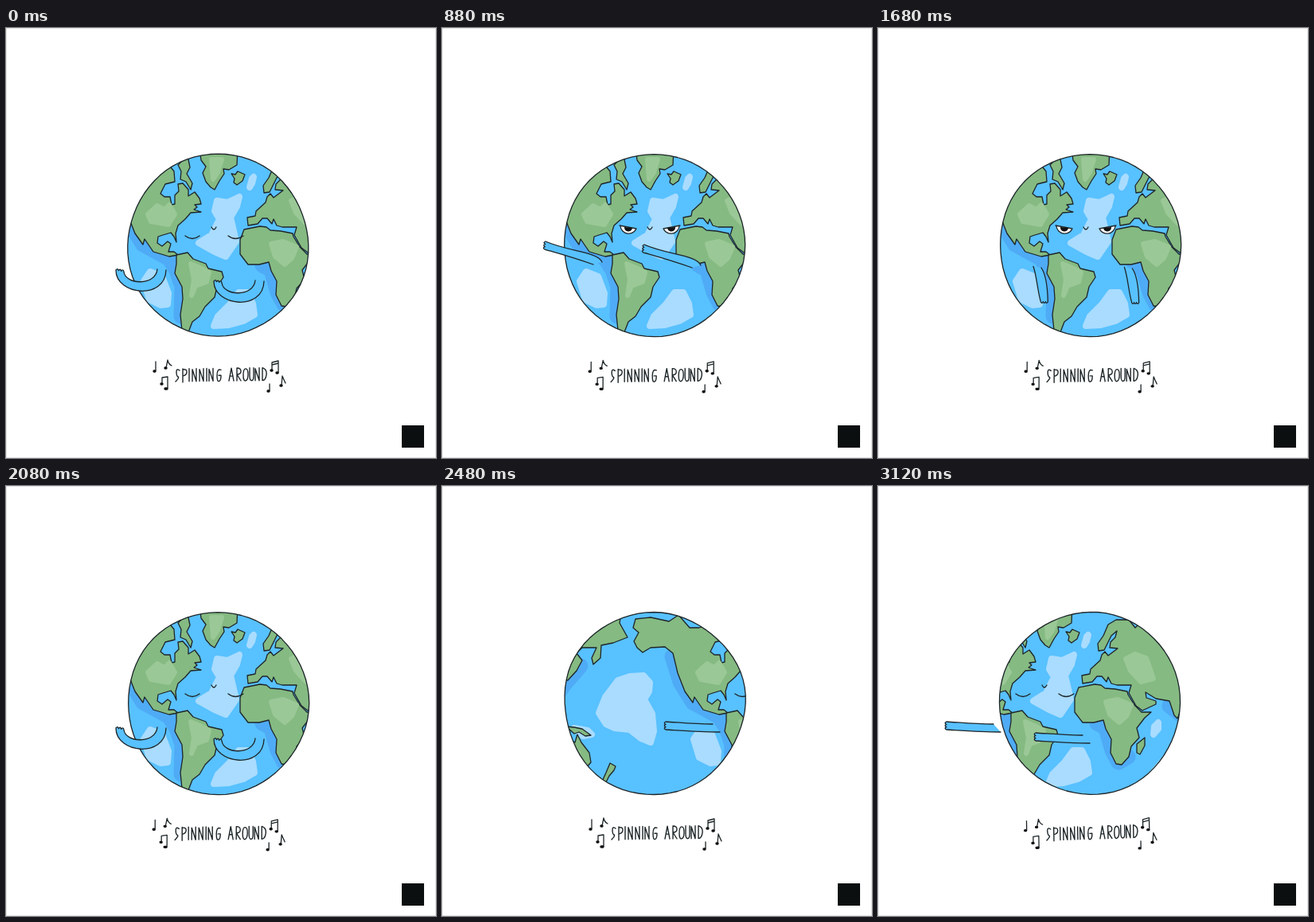
Write an HTML page that moves like this. It is 540 by 540 pixels and loops after 3.2 s.

```html
<!DOCTYPE html>
<html lang="en">
<head>
<meta charset="utf-8">
<title>Spinning around</title>
<style>
html, body { margin: 0; width: 100%; height: 100%; overflow: hidden; background: #fff; }
svg { display: block; width: 100vw; height: 100vh; }
path { stroke-linejoin: round; stroke-linecap: round; }
.ink { fill: none; stroke: #1d2528; stroke-width: 1.3; }
.land { fill: #85ba82; stroke: #1d2528; stroke-width: 1.3; }
.glow { fill: #a9dcff; stroke: #a9dcff; stroke-width: 8; }
.grass { fill: #9ac896; stroke: #9ac896; stroke-width: 6; }
.deep { fill: none; stroke: #4fabf6; stroke-width: 19; }
.arm { fill: #58c1ff; }
.dot { fill: #111; }
</style>
</head>
<body>
<svg viewBox="0 0 540 540">
  <defs>
    <clipPath id="disc"><path class="rim"/></clipPath>
    <clipPath id="reach"><path class="rim"/><rect width="266" height="540"/></clipPath>
    <g id="map">
      <path class="deep" d="M146 214L156 246L172 272L205 290L214 304L221 325L220 362M322 298L333 304L341 332L349 347L361 340M507 226L486 250L474 268L461 284L446 288L427 287L413 276"/>
      <path class="glow" d="M265 217L278 219L293 212L290 224L282 238L286 255L289 268L276 287L262 281L242 270L258 260L268 240L262 230Z
        M306 200L309 189L311 187L309 195Z
        M261 374L266 362L281 347L292 332L303 332L310 346L312 360L298 368L280 373Z
        M173 318L181 306L196 312L204 333L203 347L194 348L180 341Z
        M54 285L62 265L78 244L93 239L110 238L118 247L117 258L111 268L121 286L123 308L119 322L107 317L93 306L74 304L63 299Z
        M387 366L404 346L423 326L436 324L447 332L450 361L423 366Z
        M393 312L394 302L399 297L399 305Z
        M499 304L516 307L521 312L510 314Z"/>
      <!-- Americas -->
      <path class="land" d="M100 167L97 178L104 184L98 195L102 203L109 209L119 203L137 202L147 210L153 235L162 258L172 272L174 265L185 281L205 287L216 285L211 281L204 281L207 271L203 268L196 274L190 270L191 262L197 260L207 257L211 262L214 269L213 258L216 248L225 240L232 232L245 231L236 228L240 225L237 222L245 221L243 214L237 206L229 211L229 203L222 195L216 196L217 205L212 210L212 221L208 222L206 212L199 212L194 208L200 196L212 193L211 180L203 170L180 178L168 178L154 162L142 170L119 165Z"/>
      <path class="land" d="M216 172L228 160L231 175L227 183L234 195L232 203L226 193L219 190L220 180Z"/>
      <path class="land" d="M243 150L245 166L251 174L247 182L251 193L257 200L262 203L268 192L274 183L273 177L280 178L290 172L291 150Z"/>
      <path class="land" d="M283 183L288 184L291 180L300 184L297 192L290 197L286 194L287 189Z"/>
      <path class="land" d="M214 285L228 282L235 290L251 296L254 302L271 306L273 313L265 325L262 338L250 350L243 362L234 369L229 382L227 392L221 380L219 360L222 340L221 325L212 308L214 296Z"/>
      <!-- Africa -->
      <path class="land" d="M299 253L294 266L294 284L304 297L318 297L330 294L333 305L340 318L339 335L346 349L353 350L362 340L365 327L375 316L372 304L382 291L390 284L378 284L369 275L361 262L360 258L345 255L332 254L327 250L319 249Z"/>
      <path class="land" d="M372 324L382 316L382 326L376 337L372 335Z"/>
      <!-- Europe and Asia -->
      <path class="land" d="M304 248L303 238L313 236L314 230L326 219L328 212L332 208L336 213L348 204L338 203L339 196L345 190L347 182L340 188L331 206L324 207L323 198L330 188L336 174L346 168L362 168L370 178L380 168L380 150L560 150L556 172L566 190L548 197L533 200L532 216L523 224L521 216L527 203L509 203L502 210L509 219L502 232L491 244L481 242L487 248L484 251L480 247L480 258L475 267L462 271L463 280L457 287L454 279L450 291L446 284L443 276L437 276L427 282L423 292L419 288L413 270L396 267L383 259L384 266L396 270L396 274L379 282L371 276L362 260L365 250L347 250L340 248L336 240L334 246L328 239L322 239L316 246Z"/>
      <path class="arm ink" style="fill:#58c1ff" d="M409 170L413 175L410 185L418 177L421 165"/>
      <!-- islands and Australia -->
      <g class="land" transform="translate(191)">
        <path d="M274 330L288 320L294 314L302 318L309 322L312 312L317 322L327 335L329 347L323 354L315 352L308 346L292 349L278 354Z"/>
        <path d="M315 360L322 360L318 368ZM298 302L308 303L318 305L329 313L322 314L314 309L308 311Z"/>
        <path d="M251 292L260 300L268 305L266 307L256 301ZM268 308L287 309L280 312ZM270 297L276 292L284 293L282 303L272 304ZM284 280L289 283L291 291L286 289ZM259 290L264 293L261 296Z"/>
      </g>
      <path class="land" d="M58 371L63 360L68 348L75 352L73 357L67 364L62 374Z"/>
      <path class="grass" d="M178 234L190 223L199 228L205 222L212 234L204 247L182 243Z
        M232 296L246 302L255 307L252 319L238 324L233 336L236 316Z
        M333 271L348 268L365 275L359 289L350 297L338 287Z
        M358 217L370 211L384 216L393 242L377 246L364 232Z
        M258 165L271 165L266 181L260 190Z
        M474 334L490 330L504 335L496 340L478 342Z"/>
    </g>
  </defs>

  <rect x=".5" y=".5" width="539" height="539" fill="#fff" stroke="#e2e2e2"/>

  <g clip-path="url(#disc)">
    <rect x="140" y="145" width="252" height="252" fill="#58c1ff"/>
    <g id="world">
      <use href="#map" x="-476"/><use href="#map"/><use href="#map" x="476"/>
    </g>
    <g id="face">
      <path class="ink" d="M258 250Q261 256 264 250"/>
      <g id="shut" class="ink">
        <path d="M225 261Q234 268 243 261M279 261Q288 268 298 261"/>
      </g>
      <g id="half">
        <g id="lidded" transform="translate(234 252)">
          <path class="ink" style="fill:#fff" d="M-11 -4L10 0A10.5 10.5 0 0 1 -10 -3"/>
          <path class="dot" d="M-5 -2L5 -1A5 5 0 0 1 -5 -2Z"/>
        </g>
        <use href="#lidded" transform="matrix(-1 0 0 1 522 0)"/>
      </g>
      <g id="open">
        <g id="round">
          <circle class="ink" style="fill:#fff" cx="233" cy="252" r="10.5"/>
          <circle class="dot" cx="233" cy="252" r="5.3"/>
        </g>
        <use href="#round" x="55.5"/>
      </g>
    </g>
  </g>
  <path class="rim ink"/>
  <g clip-path="url(#reach)">
    <path class="limb arm ink" style="fill:#58c1ff"/>
    <path class="limb arm ink" style="fill:#58c1ff"/>
  </g>
  <path id="speed" class="ink" d="M281 155Q305 158 328 168M300 155Q314 157 322 161M175 357Q188 374 207 384M182 371Q189 378 198 381M330 380Q344 375 354 364M337 376Q344 372 350 363"/>

  <g id="caption" role="img" aria-label="SPINNING AROUND">
    <path id="letters" class="ink" style="stroke-width:1.4"/>
    <g id="notes">
      <path class="ink" d="M188 419V430M203 417L201 427M203 417Q204 422 208 424M196 446V439L203 438V452M334 430V420L342 418V433M334 423L342 421M331 447V455M346 449L347 437Q349 442 351 446"/>
      <path d="M186 431h1M200 427h1M195 447h1M200 453h2M333 430h1M340 433h1M329 456h1M345 449h1" fill="none" stroke="#111" stroke-width="3.4"/>
    </g>
  </g>
  <rect x="497" y="499" width="28" height="28" fill="#0b0f10"/>
</svg>
<script>
const $ = s => document.querySelector(s), all = s => [...document.querySelectorAll(s)];
const STEP = 80, LOOP = 3200, TURN = 476;

// Arm outline: shoulder, curve to the hand, across the fingers, curve back; then the right arm's offset.
const pose = {
  curl: [190,303, 188,324, 150,323, 148,306, 138,304, 138,336, 200,342, 201,304, 123,14],
  left: [201,294, 196,281, 160,281, 130,268, 129,278, 150,284, 165,288, 190,297, 124,4],
  down: [195,297, 188,315, 186,330, 185,345, 195,347, 196,335, 203,320, 206,305, 116,4],
  right: [195,304, 222,304, 228,325, 243,341, 250,337, 247,315, 230,293, 203,293, 111,-5],
  out: [197,299, 175,299, 155,297, 138,296, 138,306, 155,307, 180,309, 206,309, 112,14]
};
const armKeys = [[0,'curl'], [160,'curl'], [320,'down'], [480,'right'], [640,'down'], [800,'left'],
  [960,'left'], [1120,'down'], [1280,'right'], [1520,'right'], [1760,'down'], [1920,'curl'],
  [2080,'curl'], [2160,'out'], [3120,'out'], [3200,'curl']].map(([t, p]) => [t, pose[p]]);
const spinKeys = [[0,[0]], [2080,[0]], [2160,[2]], [2240,[20]], [2480,[143]], [3120,[429]], [3200,[TURN]]];
const lidKeys = [[0,'shut'], [240,'half'], [320,'open'], [640,'half'], [1040,'open'],
  [1680,'half'], [1840,'shut']];

function between(keys, t) {
  const i = keys.findIndex(k => k[0] > t);
  const [t0, a] = keys[i - 1], [t1, b] = keys[i];
  return a.map((v, j) => v + (b[j] - v) * (t - t0) / (t1 - t0));
}

function rim(seed, rough) {
  let d = '';
  for (let i = 0; i < 72; i++) {
    const a = i * Math.PI / 36;
    const bump = rough * (Math.sin(3 * a + seed * 2.1) + .6 * Math.sin(5 * a + seed * 1.3));
    d += (i ? 'L' : 'M') + (266.3 + (113.5 + bump) * Math.cos(a)).toFixed(1) + ' ' +
      (272.8 + (114.5 + bump) * Math.sin(a)).toFixed(1);
  }
  return d + 'Z';
}

function arm(p, dx, dy) {
  const at = (...ids) => ids.map(i => `${p[2 * i] + dx} ${p[2 * i + 1] + dy}`).join(' ');
  const [x, y] = [p[6] + dx, p[7] + dy], vx = p[8] - p[6], vy = p[9] - p[7];
  let d = `M${at(0)}C${at(1, 2, 3)}`;
  for (let i = 0; i < 3; i++) {
    const m = (i + .5) / 3, e = (i + 1) / 3;
    d += `Q${x + vx * m - vy * .35} ${y + vy * m + vx * .35} ${x + vx * e} ${y + vy * e}`;
  }
  return d + `C${at(5, 6, 7)}`;
}

const glyph = {
  S: 'm5 2q-4 -3 -4 2t2 6t-3 6', P: 'm1 0v17m0 -16q5 -1 5 3t-5 5', I: 'm1 0v16',
  N: 'm0 16v-15l5 15v-16', G: 'm6 2q-5 -2 -5 7t3 7q2 -1 2 -7h-3', A: 'm0 16l3 -16l3 16m-5 -6h4',
  R: 'm1 16v-16q5 0 5 4t-5 4l5 8', O: 'm3 1q-3 0 -3 8t3 7t3 -8t-3 -7',
  U: 'm0 0v10q0 6 2.5 6t2.5 -6v-10', D: 'm1 16v-16q6 2 5 9t-5 7'
};
const starts = [213, 221, 229, 234, 243, 251, 255, 264, 0, 280, 289, 298, 306, 313, 321];
$('#letters').setAttribute('d', [...'SPINNING AROUND'].map((c, i) =>
  c === ' ' ? '' : `M${starts[i]} ${428 - i * .1}` + glyph[c]).join(''));

const wobble = [0, 0, 1, 2, 0, 1, 2, 0];
const captionMove = ['', 'translate(-.8 .6) rotate(.2 270 435)', 'translate(-1.2 0) rotate(-1.1 270 435)'];
const show = (el, on) => el.style.display = on ? '' : 'none';

function draw(now) {
  const n = Math.floor(now % LOOP / STEP), t = n * STEP;
  const look = wobble[(n >> 1) % 8];
  const spinning = t >= 2320 && t < 3040;
  const outline = rim(spinning ? n : look, spinning ? 1.3 : .6);
  all('.rim').forEach(el => el.setAttribute('d', outline));

  let shift = between(spinKeys, t)[0];
  if (shift > TURN / 2) shift -= TURN;
  const body = shift < 0 ? shift - 5 : shift;
  $('#world').setAttribute('transform', `translate(${shift})`);
  $('#face').setAttribute('transform', `translate(${body})`);

  const lid = lidKeys.filter(k => k[0] <= t).pop()[1];
  ['shut', 'half', 'open'].forEach(id => show($('#' + id), id === lid));

  const p = between(armKeys, t);
  all('.limb').forEach((el, i) => {
    const dx = body + i * p[16], shoulder = 200 + dx;
    el.setAttribute('d', arm(p, dx, i * p[17]));
    show(el, shoulder > 147 && shoulder < 450);
  });

  show($('#speed'), t >= 2560 && t < 2960);
  $('#speed').setAttribute('transform', `rotate(${n % 2 ? 0 : 40} 266 273)`);
  $('#caption').setAttribute('transform', captionMove[look]);
}

function loop() {
  draw(performance.now());
  requestAnimationFrame(loop);
}
loop();
</script>
</body>
</html>
```
